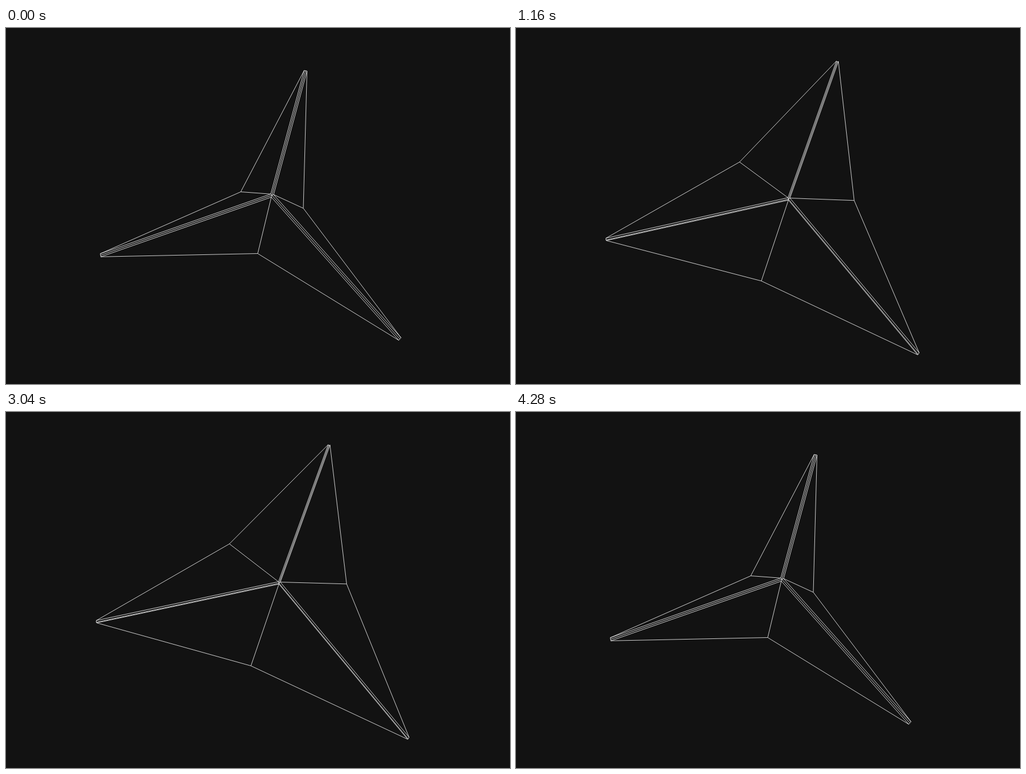
Recreate the animation shown at these times as an HTML page with a canvas. Size 890 by 629 pixels, loop 4.32 s.

```html
<!DOCTYPE html>
<html lang="en">
<head>
<meta charset="utf-8">
<title>Folding star</title>
<style>
html, body { margin: 0; width: 100%; height: 100%; overflow: hidden; background: #121212; }
canvas { display: block; }
</style>
</head>
<body>
<canvas id="stage" width="890" height="629"></canvas>
<script>
const ctx = document.getElementById('stage').getContext('2d');
const STEP = 40, LOOP = 4320, LAST = 107, PEAK = 2.12;

// Fold times in seconds, and the x and y of each vertex at those times.
const knots = [0, 0.68, 1.24, PEAK];
const paths = {
  top:         [[528.5, 550.2, 570, 604.8], [75, 63.3, 57.6, 53.4]],
  left:        [[166.5, 157.7, 159.3, 169.2], [401, 388.3, 370, 331.5]],
  right:       [[695, 708, 710, 704.1], [549, 567.8, 576, 583.7]],
  center:      [[469, 476.3, 482, 492.8], [295, 299.8, 301, 297.2]],
  upperValley: [[414, 399, 394, 402.2], [289, 259, 232.5, 192.3]],
  rightValley: [[524.5, 568.7, 601, 642.2], [318, 310, 303.3, 294.2]],
  lowerValley: [[444, 437.3, 432, 424.3], [398, 432.5, 448, 450.1]]
};

// Cubic through the four knots.
const cubic = (values, u) => values.reduce((sum, v, i) =>
  sum + knots.reduce((w, k, j) => j === i ? w : w * (u - k) / (knots[i] - k), v), 0);

const add = (p, q, s = 1) => [p[0] + q[0] * s, p[1] + q[1] * s];
const scale = (p, s) => [p[0] * s, p[1] * s];

function line(...points) {
  ctx.beginPath();
  points.forEach(p => ctx.lineTo(p[0], p[1]));
  ctx.stroke();
}

function draw(u) {
  const pose = {};
  for (const name in paths) pose[name] = paths[name].map(values => cubic(values, u));
  const { top, left, right, center, upperValley, rightValley, lowerValley } = pose;

  // The hinge strips narrow while their ridges shift as the star opens.
  const f = u / PEAK;
  const across = scale([5, 1], 1 - 0.3 * f - 0.5 * f * f);
  const down = scale([1, 5.5], 1 - 0.1 * f - 0.55 * f * f);
  const lift = scale([-0.35, 1], 1.4 * Math.sin(f * Math.PI / 2));

  const a = add(center, add(across, down), -1 / 3);
  const b = add(a, across);
  const d = add(a, down);
  const hub = add(center, lift);

  function ridge(tip, from, to) {
    const width = add(to, from, -1);
    const mid = add(tip, lift);
    line(from, add(tip, width, -0.5), mid, add(tip, width, 0.5), to);
    line(hub, mid);
    return [add(tip, width, -0.5), add(tip, width, 0.5)];
  }

  ctx.setTransform(1, 0, 0, 1, 0, 0);
  ctx.fillStyle = '#121212';
  ctx.fillRect(0, 0, 890, 629);
  ctx.translate(0.5, 0.5);
  ctx.strokeStyle = '#fff';
  ctx.lineWidth = 0.8;
  ctx.lineJoin = 'bevel';

  const [topA, topB] = ridge(top, a, b);
  const [leftA, leftD] = ridge(left, a, d);
  const [rightD, rightB] = ridge(right, d, b);
  line(topA, upperValley, leftA);
  line(topB, rightValley, rightB);
  line(leftD, lowerValley, rightD);
  line(upperValley, a, hub);
  line(rightValley, b, hub);
  line(lowerValley, d, hub);
}

const start = performance.now();
function tick() {
  const step = Math.floor((performance.now() - start) % LOOP / STEP);
  draw(Math.min(step, LAST - step) * STEP / 1000);
  requestAnimationFrame(tick);
}
tick();
</script>
</body>
</html>
```
